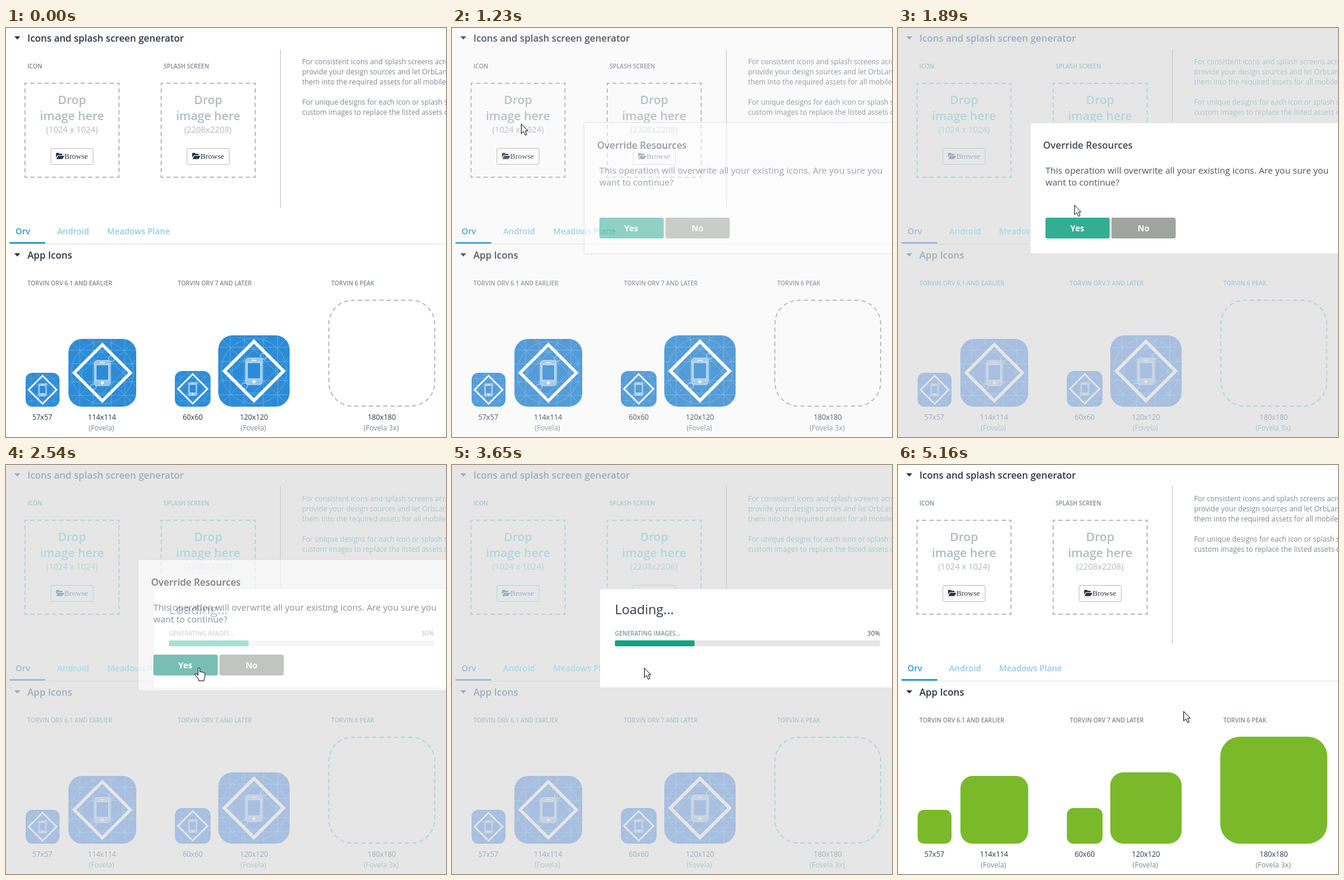
Animation, 740 px wide and 688 px high, one loop 6320 ms. Source, as an HTML page:

```html
<!DOCTYPE html>
<html lang="en">
<head>
<meta charset="utf-8">
<title>Icon generator</title>
<style>
@property --bg { syntax: "<color>"; inherits: true; initial-value: #fff; }
@property --ink { syntax: "<color>"; inherits: true; initial-value: #2b3645; }
@property --grey { syntax: "<color>"; inherits: true; initial-value: #7c8893; }
@property --pale { syntax: "<color>"; inherits: true; initial-value: #b0bbc1; }
@property --dash { syntax: "<color>"; inherits: true; initial-value: #bbb; }
@property --rule { syntax: "<color>"; inherits: true; initial-value: #bcbcbc; }
@property --tab { syntax: "<color>"; inherits: true; initial-value: #92cbe8; }
@property --active { syntax: "<color>"; inherits: true; initial-value: #2b9bd1; }
@property --blue { syntax: "<color>"; inherits: true; initial-value: #2d8bd6; }
@property --thin { syntax: "<color>"; inherits: true; initial-value: #62b4e6; }

html, body { margin: 0; width: 100%; height: 100%; overflow: hidden; background: #fff; }
svg { display: block; font: 12px "Open Sans", sans-serif; }
svg * { animation: 6320ms linear infinite; }

.semi { font-weight: 600; }
.head { font-size: 16px; font-weight: 600; }
.label { font-size: 10px; font-weight: 600; }
.mid { text-anchor: middle; }
.ink { fill: var(--ink); }
.grey { fill: var(--grey); }
.pale { fill: var(--pale); }
.dashed { fill: none; stroke: var(--dash); stroke-width: 2; stroke-dasharray: 7.150 5; stroke-dashoffset: 3.575; }
.browse { font: 13px "Liberation Serif", serif; }

/* Page colours fade while a dialog is open */
.page { animation-name: dim; }
@keyframes dim {
  0%, 16.456%, 81.646%, 100% {
    --bg: #fff; --ink: #2b3645; --grey: #7c8893; --pale: #b0bbc1; --dash: #bbb;
    --rule: #bcbcbc; --tab: #92cbe8; --active: #2b9bd1; --blue: #2d8bd6; --thin: #62b4e6;
  }
  21.835% {
    --bg: #f6f6f6; --ink: #70777f; --grey: #a4acb3; --pale: #bec6cb; --dash: #c3c3c3;
    --rule: #c4c4c4; --tab: #aed3e8; --active: #67afe2; --blue: #72a9d9; --thin: #94c3e6;
  }
  26.108%, 76.899% {
    --bg: #e6e6e6; --ink: #9daec0; --grey: #a9c8d2; --pale: #b2d6de; --dash: #b2d6de;
    --rule: #c2c6c8; --tab: #a9dce6; --active: #a0bbdd; --blue: #a9bee0; --thin: #a9d8e2;
  }
}

/* Hard switches */
.before, .empty, .outline, .ghost, .arrow, .hand, .full, .hover { animation-timing-function: step-end; }
.before { animation-name: before; }
.empty { animation-name: empty; }
.outline { animation-name: outline; }
.ghost { animation-name: ghost; }
.arrow { animation-name: arrow; }
.hand { animation-name: hand; }
.full { animation-name: full; }
.hover { animation-name: hover; }
@keyframes before { 0% { opacity: 1; } 76.899%, 100% { opacity: 0; } }
@keyframes empty { 0% { opacity: 1; } 73.734%, 100% { opacity: 0; } }
@keyframes outline { 0%, 76.899%, 100% { opacity: 0; } 73.734% { opacity: 1; } }
@keyframes full { 0% { opacity: 0; } 73.734%, 100% { opacity: 1; } }
@keyframes ghost { 0%, 16.456%, 100% { opacity: 0; } 4.589% { opacity: 1; } }
@keyframes arrow { 0%, 31.646% { opacity: 0; } 4.589%, 57.753%, 100% { opacity: 1; } }
@keyframes hand { 0%, 57.753%, 100% { opacity: 0; } 31.646% { opacity: 1; } }
@keyframes hover { 0%, 100% { fill: #34ae93; } 31.646% { fill: #2f9b8b; } }

/* Fades */
.after { animation-name: after; }
.confirm { animation-name: confirm; }
.loading { animation-name: loading; }
@keyframes after { 0%, 76.898% { opacity: 0; } 76.899% { opacity: .3; } 81.646%, 100% { opacity: 1; } }
@keyframes confirm {
  0%, 16.456% { opacity: 0; }
  22.152%, 37.658% { opacity: 1; }
  40.19% { opacity: .65; }
  43.038%, 100% { opacity: 0; }
}
@keyframes loading {
  0%, 37.657% { opacity: 0; }
  37.658%, 76.899% { opacity: 1; }
  81.646%, 100% { opacity: 0; }
}

.pointer { animation-name: pointer; }
@keyframes pointer {
  0%, 4.589% { transform: translate(12px, 252px); animation-timing-function: cubic-bezier(.3, .3, .5, 1); }
  10.759%, 22.152% { transform: translate(116px, 161px); animation-timing-function: ease-in; }
  26.345% { transform: translate(252px, 225px); animation-timing-function: cubic-bezier(.2, .4, .5, 1); }
  36.076%, 57.753% { transform: translate(323px, 341px); animation-timing-function: ease-in-out; }
  65.823%, 100% { transform: translate(480px, 414px); }
}
</style>
</head>
<body>
<svg width="740" height="688" viewBox="0 0 740 688">
  <defs>
    <g id="blueprint">
      <rect width="120" height="120" rx="24" fill="var(--blue)"/>
      <g fill="none" stroke="var(--thin)" stroke-width=".8">
        <circle cx="60" cy="60" r="55"/>
        <circle cx="60" cy="60" r="37"/>
        <path d="M7 7L113 113M113 7L7 113M0 20H120M0 100H120M20 0V120M100 0V120M0 44H120M0 76H120M44 0V120M76 0V120M36 0L120 84M0 84L84 0M36 120L120 36"/>
      </g>
      <path d="M60 10.200L109.800 60 60 109.800 10.200 60Z" fill="none" stroke="var(--bg)" stroke-width="5.500"/>
      <g stroke="var(--bg)" fill="none">
        <rect x="46" y="38" width="28" height="45" rx="5" fill="var(--bg)" fill-opacity=".5" stroke-opacity=".7"/>
        <rect x="49" y="46" width="22" height="27" fill="var(--blue)" stroke-opacity=".8"/>
        <path d="M56 42H64" stroke-width="1.500"/>
        <circle cx="60" cy="78" r="2.200" fill="var(--bg)"/>
        <circle cx="76" cy="35" r="5" stroke-opacity=".8"/>
        <circle cx="44" cy="85" r="5" stroke-opacity=".8"/>
      </g>
    </g>
    <rect id="tile" width="120" height="120" rx="22" fill="#7aba2a"/>
    <path id="fold" d="M0 0H10L5 5.500Z" fill="var(--ink)"/>
    <g id="drop">
      <rect class="dashed" x="1" y="1" width="158" height="158"/>
      <g class="pale mid">
        <text class="semi" x="80" y="36" font-size="20">Drop</text>
        <text class="semi" x="80" y="63" font-size="20">image here</text>
      </g>
      <rect x="44.500" y="110.500" width="71" height="27" rx="2.500" fill="var(--bg)" stroke="var(--dash)"/>
      <g class="ink">
        <path transform="translate(53 118)" d="M0 1.500Q0 0 1.500 0H4.500L6 1.500H10Q11 1.500 11 2.500V4H4Q3 4 2.300 4.800L0 8ZM4 5H14L11.500 9.500Q11 10.500 10 10.500H.7L3 5.700Z"/>
        <text class="browse" x="67" y="128">Browse</text>
      </g>
    </g>
  </defs>

  <g class="page">
    <rect width="740" height="688" fill="var(--bg)"/>
    <use href="#fold" x="14" y="14"/>
    <text class="head ink" x="36" y="23">Icons and splash screen generator</text>
    <g class="label grey">
      <text x="36" y="68">ICON</text>
      <text x="265" y="68">SPLASH SCREEN</text>
      <text x="36" y="433">TORVIN ORV 6.1 AND EARLIER</text>
      <text x="289" y="433">TORVIN ORV 7 AND LATER</text>
      <text x="547" y="433">TORVIN 6 PEAK</text>
    </g>
    <use href="#drop" x="31" y="92"/>
    <use href="#drop" x="260" y="92"/>
    <g class="pale mid" font-size="14">
      <text x="111" y="176">(1024 x 1024)</text>
      <text x="339.500" y="176">(2208x2208)</text>
    </g>
    <path d="M461.500 36V302" stroke="var(--rule)"/>
    <g class="grey">
      <text x="498" y="61">For consistent icons and splash screens across</text>
      <text x="498" y="78">provide your design sources and let OrbLantern</text>
      <text x="498" y="95">them into the required assets for all mobile</text>
      <text x="498" y="129">For unique designs for each icon or splash screen</text>
      <text x="498" y="146">custom images to replace the listed assets of</text>
    </g>

    <g class="semi" font-size="14" fill="var(--tab)">
      <text x="16" y="347" fill="var(--active)">Orv</text>
      <text x="86" y="347">Android</text>
      <text x="170" y="347">Meadows Plane</text>
    </g>
    <path d="M66 363.500H740" stroke="var(--rule)" stroke-opacity=".45"/>
    <rect x="6" y="360" width="60" height="3" fill="var(--active)"/>
    <use href="#fold" x="14" y="379"/>
    <text class="head ink" x="36" y="388">App Icons</text>

    <g class="before">
      <use href="#blueprint" transform="translate(33 580) scale(.475)"/>
      <use href="#blueprint" transform="translate(105 523) scale(.95)"/>
      <use href="#blueprint" transform="translate(284 577) scale(.5)"/>
      <use href="#blueprint" transform="translate(357 517)"/>
      <rect class="dashed empty" x="543" y="458" width="178" height="178" rx="40"/>
      <rect class="outline" x="542.500" y="457.500" width="179" height="179" rx="40" fill="none" stroke="var(--dash)"/>
    </g>
    <g class="after">
      <use href="#tile" transform="translate(33 580) scale(.475)"/>
      <use href="#tile" transform="translate(105 523) scale(.95)"/>
      <use href="#tile" transform="translate(284 577) scale(.5)"/>
      <use href="#tile" transform="translate(357 517)"/>
      <use href="#tile" transform="translate(542 457) scale(1.5)"/>
    </g>

    <g class="ink mid">
      <text x="61" y="659">57x57</text>
      <text x="161.500" y="659">114x114</text>
      <text x="314" y="659">60x60</text>
      <text x="417" y="659">120x120</text>
      <text x="632" y="659">180x180</text>
    </g>
    <g class="grey mid">
      <text x="160.500" y="677">(Fovela)</text>
      <text x="416" y="677">(Fovela)</text>
      <text x="631" y="677">(Fovela 3x)</text>
    </g>
  </g>

  <g class="loading">
    <rect x="249" y="209" width="500" height="165" rx="2" fill="#fff"/>
    <text x="274" y="251" font-size="22" fill="#2f3b4a">Loading...</text>
    <text class="label" x="274" y="287" fill="#84919d">GENERATING IMAGES...</text>
    <g font-size="11" text-anchor="end" fill="#34475a">
      <text class="empty" x="720" y="287">30%</text>
      <text class="full" x="720" y="287">100%</text>
    </g>
    <rect x="274" y="295" width="446" height="10" rx="2" fill="#e6e6e6"/>
    <g fill="#0fa583">
      <rect class="empty" x="274" y="295" width="134" height="10" rx="2"/>
      <rect class="full" x="274" y="295" width="446" height="10" rx="2"/>
    </g>
  </g>

  <g class="confirm">
    <rect x="222" y="159" width="530" height="221" rx="3" fill="#fff" stroke="#e4e4e4" stroke-width="2"/>
    <text class="head" x="244" y="203" fill="#3d4853">Override Resources</text>
    <g font-size="15" fill="#4a5662">
      <text x="248" y="245">This operation will overwrite all your existing icons. Are you sure you</text>
      <text x="248" y="265">want to continue?</text>
    </g>
    <rect class="hover" x="248" y="319" width="108" height="35" rx="3" fill="#34ae93"/>
    <rect x="359" y="319" width="108" height="35" rx="3" fill="#9fa59e"/>
    <g class="mid" font-size="14" font-weight="700" fill="#fff">
      <text x="301.500" y="342">Yes</text>
      <text x="413" y="342">No</text>
    </g>
  </g>

  <g class="pointer">
    <g class="ghost">
      <rect x="-19" y="-32" width="47" height="46" rx="3" fill="#86c03c" opacity=".86"/>
      <text class="mid" x="5" y="31" font-size="11" fill="#fff" style="text-shadow: 0 1px 2px #555">icon.png</text>
      <rect x="11.500" y="13.500" width="56" height="19" fill="#fff" stroke="#767676"/>
      <path d="M15 21.500H20.500V18L27 23 20.500 28V24.500H15Z" fill="#1a6fd0"/>
      <text x="31" y="27" fill="#0a1fa8">Move</text>
    </g>
    <path class="arrow" d="M.5 .5V16.500L4.300 13 7 19.300 9.800 18.200 7.200 12H11.500Z" fill="#fff" stroke="#000"/>
    <path class="hand" d="M0 1Q1.500-1 3 1V7Q4.500 6 6 7.500 7.500 6.500 9 8.300 10.500 7.500 11.500 9.500V15Q11.500 17 10 19V22H1V19.500L-5 12Q-5.500 9.500-3 10L0 12.500Z" fill="#fff" stroke="#000"/>
  </g>
</svg>
</body>
</html>
```
